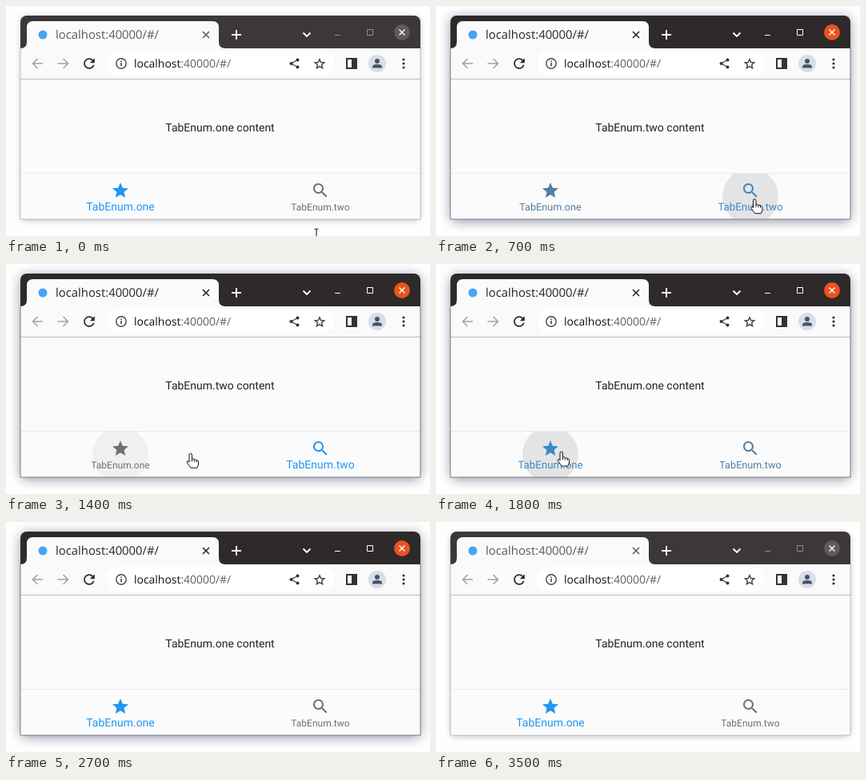
Write an HTML page that moves like this. It is 530 px wide and 288 px high and loops after 3600 ms.

```html
<!DOCTYPE html>
<html lang="en">
<head>
<meta charset="utf-8">
<title>Bottom navigation tabs</title>
<style>
  html, body { margin: 0; width: 100%; height: 100%; overflow: hidden; background: #fefefe; }
  svg { display: block; width: 530px; height: 288px; }
  text { text-rendering: geometricPrecision; }
  .chrome { font-family: "Open Sans", "Noto Sans", sans-serif; }
  .app { font-family: Roboto, Arial, sans-serif; text-anchor: middle; }
  .line { fill: none; stroke-width: 1.6; }
</style>
</head>
<body>
<svg viewBox="0 0 530 288">
  <defs>
    <filter id="wide" x="-10%" y="-15%" width="120%" height="130%"><feGaussianBlur stdDeviation="7"/></filter>
    <filter id="soft" x="-10%" y="-15%" width="120%" height="130%"><feGaussianBlur stdDeviation="3.5"/></filter>
    <clipPath id="navClip"><rect x="18" y="210" width="500" height="57"/></clipPath>
  </defs>

  <rect id="shadowOn" x="18" y="14" width="500" height="256" rx="8" fill="#1c1c48" filter="url(#wide)"/>
  <rect id="shadowOff" x="18" y="14" width="500" height="255" rx="8" fill="#1c1c48" filter="url(#soft)"/>
  <path id="titleBar" d="M18 267V20a8 8 0 0 1 8-8H510a8 8 0 0 1 8 8V267z"/>

  <!-- tab strip -->
  <path d="M18 53q8 0 8-8V27q0-8 8-8H258q8 0 8 8v18q0 8 8 8z" fill="#fafafb"/>
  <circle cx="46" cy="36" r="5.5" fill="#42a5f5"/>
  <text id="tabTitle" class="chrome" x="62" y="41" font-size="14.85">localhost:40000/#/</text>
  <path id="tabClose" class="line" d="M246 32l8 8m0-8l-8 8"/>
  <path d="M282 36h12M288 30v12M371.5 33.5l4.5 4.5 4.5-4.5" class="line" stroke="#fff" style="stroke-width:1.9"/>
  <path id="windowKeys" d="M411 36.5h7M451.5 29.5h7v7h-7z" fill="none"/>
  <circle id="closeDisc" cx="495" cy="33" r="10"/>
  <path d="M491.5 29.5l7 7m0-7l-7 7" class="line" stroke="#fff" style="stroke-width:1.4"/>

  <!-- toolbar -->
  <rect x="18" y="53" width="500" height="39" fill="#fafafb"/>
  <rect x="126" y="56" width="284" height="31" rx="15.5" fill="#fff"/>
  <path d="M46 72H33.5m6-6l-6 6 6 6M64.5 72H77.5m-6-6l6 6-6 6" class="line" stroke="#a2a3a5"/>
  <path transform="translate(93.8 61.8) scale(.85)" fill="#2a2a2c" d="M17.65 6.35C16.2 4.9 14.21 4 12 4c-4.42 0-8 3.58-8 8s3.58 8 8 8c3.73 0 6.84-2.55 7.73-6h-2.08c-.82 2.33-3.04 4-5.65 4-3.31 0-6-2.69-6-6s2.69-6 6-6c1.66 0 3.14.69 4.22 1.78L13 11h7V4z"/>
  <g stroke="#434447" fill="none">
    <circle cx="144" cy="72" r="6.2" stroke-width="1.4"/>
    <path d="M144 71v4.3M144 68.4v1.5" stroke-width="1.6"/>
    <path d="M364.5 67.5l-8 4.5 8 4.5" stroke-width="1.3"/>
    <path transform="translate(383 63) scale(.75)" stroke-width="1.9" d="M12 16.7l4.8 2.9-1.3-5.5 4.2-3.6-5.5-.5L12 4.9 9.800 10l-5.5.5 4.2 3.6-1.3 5.5z"/>
  </g>
  <g fill="#333437">
    <circle cx="364.5" cy="67.5" r="2"/><circle cx="356.5" cy="72" r="2"/><circle cx="364.5" cy="76.5" r="2"/>
    <path fill-rule="evenodd" d="M425 65h14v14h-14zM427 67v10h5v-10z"/>
    <circle cx="497" cy="67" r="1.6"/><circle cx="497" cy="72" r="1.6"/><circle cx="497" cy="77" r="1.6"/>
  </g>
  <circle cx="464" cy="72" r="11" fill="#dadde7"/>
  <g fill="#46526f"><circle cx="464" cy="69" r="3"/><path d="M458 77.5v-1.5q0-3 6-3t6 3v1.5z"/></g>
  <text class="chrome" x="160" y="77" font-size="13.95" fill="#111">localhost<tspan fill="#626366">:40000/#/</tspan></text>

  <!-- page -->
  <rect x="18" y="92" width="500" height="175" fill="#fbfbfc"/>
  <path d="M18 91.5H518" stroke="#bcbcc0"/>
  <text id="content" class="app" x="267.5" y="157" font-size="14" fill="#222"></text>
  <path d="M18 209.5H518" stroke="#e9e9ed"/>
  <g clip-path="url(#navClip)">
    <circle id="ink0" cx="143" cy="238.5" r="35"/>
    <circle id="ink1" cx="393" cy="238.5" r="35"/>
  </g>
  <g id="tab0">
    <path transform="translate(131 219)" d="M12 17.27L18.18 21l-1.64-7.03L22 9.24l-7.19-.61L12 2 9.19 8.63 2 9.24l5.46 4.73L5.82 21z"/>
    <text class="app" x="143" y="256">TabEnum.one</text>
  </g>
  <g id="tab1">
    <path transform="translate(381 219)" d="M15.5 14h-.79l-.28-.27C15.41 12.59 16 11.11 16 9.5 16 5.91 13.09 3 9.5 3S3 5.91 3 9.5 5.91 16 9.5 16c1.61 0 3.09-.59 4.23-1.57l.27.28v.79l5 4.99L20.49 19zm-6 0C7.01 14 5 11.99 5 9.5S7.01 5 9.5 5 14 7.01 14 9.5 11.99 14 9.5 14z"/>
    <text class="app" x="393" y="256">TabEnum.two</text>
  </g>
  <path id="outline" d="M18 53V267H518V53" fill="none" stroke-width=".8"/>

  <!-- pointer, with its hot spot at 0,0 -->
  <g id="pointer">
    <g id="hand" stroke="#111" stroke-linejoin="round">
      <path fill="#fff" d="M-2 2Q-2 0-.3 0T1.5 2V7l1-.3q1.4-.2 1.8 1l1.2-.2q1.3 0 1.6 1.2l1 .1q1.5.3 1.4 2V14l-1.6 4H0L-4.6 11.6q-.8-1.6.5-2t2.1 1.4z"/>
      <path fill="none" d="M1.5 7v3M4.3 7.7v2.8M7.1 8.7v2.3"/>
    </g>
    <path id="beam" fill="none" stroke="#333" stroke-width="1.2" d="M-2.5-8q2 0 2.5 1 .5-1 2.5-1M0-7V7M-2.5 8q2 0 2.5-1 .5 1 2.5 1"/>
  </g>
</svg>
<script>
const LOOP = 3600, STEP = 100;
const PRESS_TWO = 580, PRESS_ONE = 1680;
const GREY = [112, 112, 112], BLUE = [33, 150, 243];
// time, x, y of the hot spot
const TRAIL = [
  [0, 388, 287], [200, 398, 262], [300, 402, 246], [400, 403, 242], [600, 401, 242],
  [1000, 391, 241], [1100, 384, 241], [1500, 180, 236], [1700, 157, 235],
  [1900, 157, 235], [2100, 170, 268], [2200, 180, 300]
];

const $ = id => document.getElementById(id);
const set = (el, attrs) => { for (const k in attrs) el.setAttribute(k, attrs[k]); };
const mix = (a, b, p) => a + (b - a) * p;
const blend = (a, b, p) => `rgb(${a.map((v, i) => Math.round(mix(v, b[i], p)))})`;
const ramp = (t, start, length) => Math.min(1, Math.max(0, (t - start) / length));
const ease = p => p * p * (3 - 2 * p);

function pointerAt(t) {
  const i = TRAIL.findIndex(k => k[0] > t);
  if (i < 0) return TRAIL[TRAIL.length - 1].slice(1);
  const [a, b] = [TRAIL[i - 1], TRAIL[i]];
  const p = ramp(t, a[0], b[0] - a[0]);
  return [mix(a[1], b[1], p), mix(a[2], b[2], p)];
}

function drawWindow(focus) {
  const tone = (off, on) => blend(off, on, focus);
  const ink = tone([92, 92, 92], [38, 38, 38]);
  set($('shadowOn'), { opacity: .45 * focus });
  set($('shadowOff'), { opacity: .26 * (1 - focus) });
  set($('titleBar'), { fill: tone([60, 56, 56], [46, 42, 42]) });
  set($('tabTitle'), { fill: ink });
  set($('tabClose'), { stroke: ink });
  set($('windowKeys'), { stroke: tone([146, 143, 142], [255, 255, 255]) });
  set($('closeDisc'), { fill: tone([94, 91, 90], [233, 84, 32]) });
  set($('outline'), { stroke: tone([178, 178, 182], [100, 100, 104]) });
}

function drawTab(index, chosen, ink) {
  const tab = $('tab' + index);
  set(tab, { fill: blend(GREY, BLUE, chosen) });
  set(tab.querySelector('text'), { 'font-size': mix(12, 14, chosen) });
  set($('ink' + index), { opacity: ink });
}

function draw(t) {
  drawWindow(ramp(t, 200, 150) * (1 - ramp(t, 2700, 200)));

  const [x, y] = pointerAt(t);
  const inNav = y >= 210 && y < 267;
  set($('pointer'), { transform: `translate(${x} ${y})` });
  set($('hand'), { visibility: inNav ? 'visible' : 'hidden' });
  set($('beam'), { visibility: inNav ? 'hidden' : 'visible' });

  const two = ease(ramp(t, PRESS_TWO, 200)) * (1 - ease(ramp(t, PRESS_ONE, 200)));
  const splash = press => t < press ? 0 : .045 * (1 - ramp(t, press + 120, 250));
  const hover = inside => inNav && inside ? .045 : 0;
  drawTab(0, 1 - two, hover(x < 268) + splash(PRESS_ONE));
  drawTab(1, two, hover(x >= 268) + splash(PRESS_TWO));

  const name = t >= PRESS_TWO && t < PRESS_ONE ? 'two' : 'one';
  $('content').textContent = `TabEnum.${name} content`;
}

const begin = performance.now();
function tick() {
  const t = (performance.now() - begin) % LOOP;
  draw(Math.floor(t / STEP) * STEP);
  requestAnimationFrame(tick);
}
tick();
</script>
</body>
</html>
```
